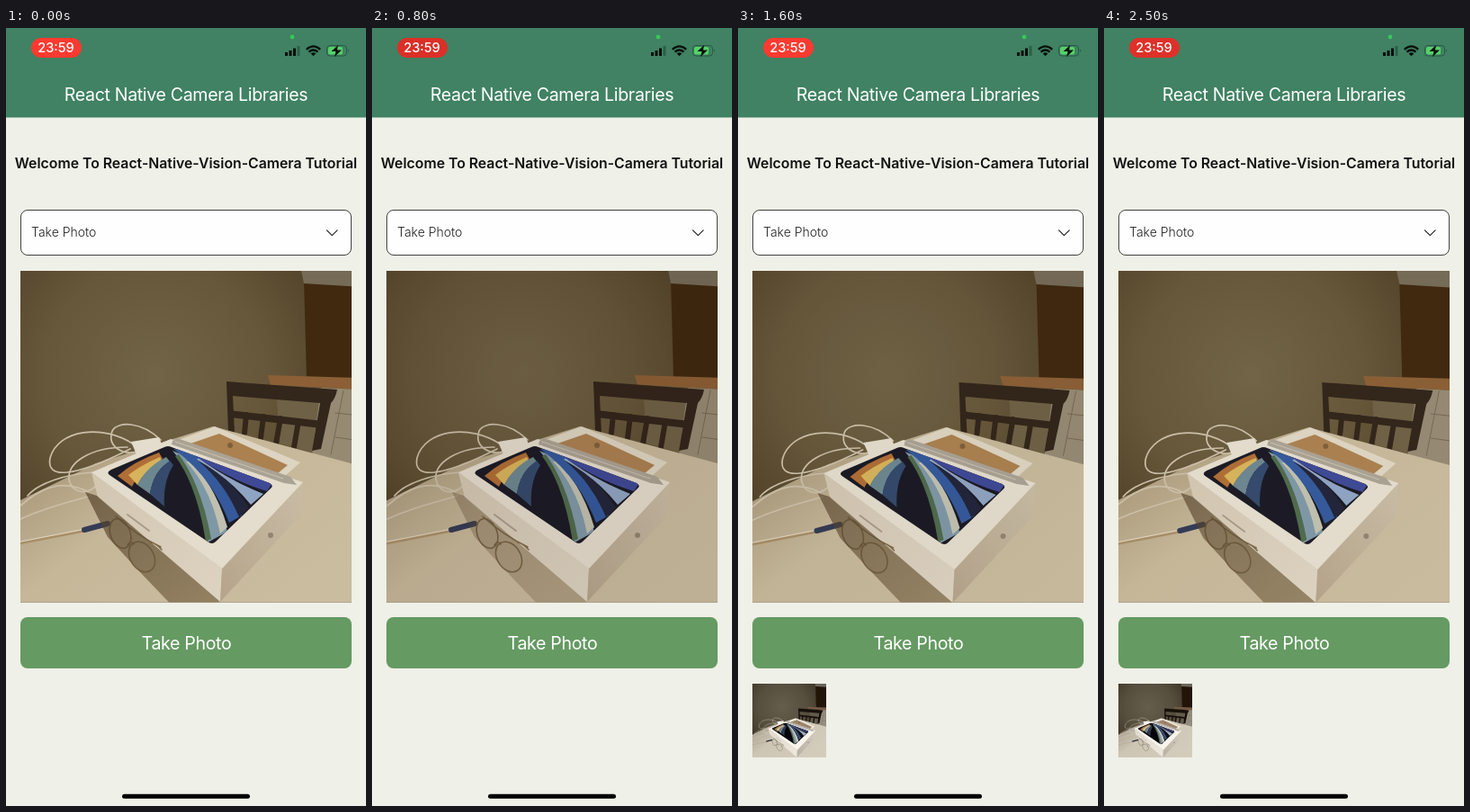
Write an HTML page that moves like this. It is 400 px wide and 865 px high and loops after 2.6 s.

```html
<!DOCTYPE html>
<html lang="en">
<head>
<meta charset="utf-8">
<title>Camera tutorial</title>
<style>
  html, body { margin: 0; width: 100%; height: 100%; overflow: hidden; background: #eff0e7; }
  svg { display: block; width: 100%; height: 100%; }
  text { font-family: Inter, Roboto, sans-serif; }
  .line { fill: none; stroke-linecap: round; stroke-linejoin: round; }
  .flashed { filter: saturate(.45) contrast(1.25); }
</style>
</head>
<body>
<svg viewBox="0 0 400 865">
  <defs>
    <clipPath id="frame"><path d="M16 270H384V638.500H16Z"/></clipPath>
    <clipPath id="display"><path d="M117 491L176 466Q180 464 184 466L293 506Q298 509 294 512L233 571Q229 575 224 571L115 497Q111 494 117 491Z"/></clipPath>
    <radialGradient id="wall" gradientUnits="userSpaceOnUse" cx="165" cy="385" r="250">
      <stop offset="0" stop-color="#726446"/>
      <stop offset=".5" stop-color="#66573a"/>
      <stop offset=".8" stop-color="#55462b"/>
      <stop offset="1" stop-color="#40301a"/>
    </radialGradient>
    <linearGradient id="table" x1="0" y1="0" x2="1" y2=".7">
      <stop offset="0" stop-color="#9c8b6c"/>
      <stop offset=".45" stop-color="#c6b799"/>
      <stop offset="1" stop-color="#cabc9f"/>
    </linearGradient>
    <linearGradient id="side" x1="0" y1="1" x2="1" y2="0">
      <stop offset="0" stop-color="#b5a48b"/>
      <stop offset="1" stop-color="#c9bca5"/>
    </linearGradient>
    <linearGradient id="front" x1="0" y1="0" x2="1" y2="1">
      <stop offset="0" stop-color="#d2c6b1"/>
      <stop offset="1" stop-color="#ddd3c1"/>
    </linearGradient>
    <linearGradient id="shade" x1="0" y1="0" x2="1" y2="1">
      <stop offset="0" stop-color="#4c3a22"/>
      <stop offset="1" stop-color="#7a6444"/>
    </linearGradient>

    <g id="scene">
      <path d="M6 260H394V650H6Z" fill="url(#wall)"/>
      <!-- kitchen -->
      <path d="M331 280H394V400L334 390Z" fill="#40290f"/>
      <path d="M326 260H394V288L331 284Z" fill="#756b57"/>
      <path d="M291 386L394 389V402L294 397Z" fill="#8c5f36"/>
      <path d="M300 397L350 400V475L304 462Z" fill="#6f6146"/>
      <path d="M350 400L394 402V492L340 475Z" fill="#968a73"/>
      <path d="M375 403L361 474M366 428L394 431M366 455L394 459" class="line" stroke="#75694f"/>
      <!-- chair -->
      <path d="M245 393L368 402Q366 412 361 417L350 468L340 470L349 417L252 409L254 450H247Z" fill="#33261b"/>
      <path d="M248 425L352 437L350 445L249 433Z" fill="#33261b"/>
      <path d="M267 430L265 450M286 432L283 456M305 434L300 462M325 437L320 466" class="line" stroke="#33261b" stroke-width="6"/>
      <!-- table -->
      <path d="M6 530L100 484L230 443L394 487V650H6Z" fill="url(#table)"/>
      <path d="M183 461L232 443L327 483L310 498Z" fill="#ddd4c1"/>
      <path d="M205 462L237 451L313 486L302 495Z" fill="#ab8150"/>
      <circle cx="249" cy="464" r="3" fill="#806039"/>
      <!-- cables -->
      <g class="line" stroke="#cbbfa8" stroke-width="1.700">
        <path d="M142 463C108 440 58 446 49 478C44 502 75 500 138 468"/>
        <path d="M172 458C150 437 124 437 118 448C112 466 130 475 146 471"/>
        <path d="M135 466C92 466 68 484 70 502C73 516 88 520 99 510"/>
        <path d="M98 494C66 496 36 506 24 520M90 515C60 501 38 512 16 531M94 520C60 530 40 535 16 546"/>
      </g>
      <path d="M139 460L170 455L175 468L145 474Z" fill="#e4dccd"/>
      <!-- box -->
      <path d="M95 494L240 601L238 638L102 522Z" fill="url(#front)"/>
      <path d="M240 601L330 505L328 541L238 638Z" fill="url(#side)"/>
      <path d="M95 494L183 457L330 505L240 601Z" fill="#e4dccc"/>
      <path d="M135 541L159 559" class="line" stroke="#a99b86" stroke-width="2"/>
      <circle cx="294" cy="564" r="3" fill="#938471"/>
      <g clip-path="url(#display)">
        <path d="M100 450H310V590H100Z" fill="#1c1b25"/>
        <path d="M124 498Q142 482 170 472L174 479Q150 488 140 510Z" fill="#b06e35"/>
        <path d="M136 497Q150 486 171 477L174 482Q155 490 146 508Z" fill="#d6b35c"/>
        <path d="M146 508Q156 488 178 477L182 482Q164 492 160 518Z" fill="#6d8790"/>
        <path d="M160 518Q163 494 182 481L186 486Q174 505 176 532Z" fill="#354a6c"/>
        <path d="M185 470Q214 502 224 572L246 560Q230 505 200 476Z" fill="#7f98a6"/>
        <path d="M188 476Q212 508 222 571L228 568Q217 508 192 474Z" fill="#4f6b4c"/>
        <path d="M200 482Q228 512 238 562L246 555Q232 508 205 482Z" fill="#c0c0b0"/>
        <path d="M186 468Q228 498 248 550L262 542Q240 500 212 470Z" fill="#35599b"/>
        <path d="M212 480Q243 505 259 544L270 533Q250 502 218 480Z" fill="#23253a"/>
        <path d="M212 480Q248 500 272 530L286 518Q246 502 214 478Z" fill="#8fa4c2"/>
        <path d="M200 465L300 500L290 515Q246 502 202 470Z" fill="#3f4a96"/>
      </g>
      <path d="M185 459L190 456L316 499L323 508L309 506L184 463Z" fill="#aaa293"/>
      <path d="M188 460L308 501" class="line" stroke="#c9c1b2"/>
      <!-- pen and glasses -->
      <path d="M6 575L88 559" class="line" stroke="#a88e68" stroke-width="2.500"/>
      <path d="M6 573L88 557" class="line" stroke="#e1d6c1"/>
      <path d="M87 558L113 551" class="line" stroke="#343c55" stroke-width="6"/>
      <g class="line" stroke="#806a49" stroke-width="1.600">
        <ellipse cx="127" cy="562" rx="11" ry="17" transform="rotate(-20 127 562)"/>
        <ellipse cx="151" cy="588" rx="13" ry="18" transform="rotate(-32 151 588)"/>
        <path d="M135 575Q139 569 142 574M122 543Q145 564 172 577M161 572Q167 573 173 580"/>
      </g>
    </g>
  </defs>

  <path d="M0 0H400V865H0Z" fill="#eff0e7"/>
  <path d="M0 0H400V99.500H0Z" fill="#408263"/>

  <!-- status bar -->
  <rect id="pill" x="28" y="11" width="56" height="22" rx="11"/>
  <text x="55.5" y="27.2" font-size="14.6" font-weight="500" fill="#fff" text-anchor="middle">23:59</text>
  <circle cx="318" cy="10" r="2.4" fill="#38c75a"/>
  <path d="M310 27h3v4h-3zM314.500 25h3v6h-3zM319 22.500h3v8.500h-3z" fill="#07100c"/>
  <path d="M323.500 20h3v11h-3z" fill="#2c6049"/>
  <path d="M333.800 23.800Q341.500 17 349.200 23.800M336.500 26.700Q341.500 22.400 346.500 26.700" fill="none" stroke="#07100c" stroke-width="2.300"/>
  <path d="M338.700 28.500Q341.500 26 344.300 28.500L341.500 31.300Z" fill="#07100c"/>
  <rect x="356.500" y="19.500" width="22" height="11.500" rx="3.500" fill="none" stroke="#275b44"/>
  <rect x="358" y="21" width="16" height="8.500" rx="2" fill="#55d168"/>
  <path d="M380 23.500q2 1.700 0 3.500z" fill="#275b44"/>
  <path d="M369 19L361.500 26H366.500L365 32L373 24.500H368Z" fill="#07100c"/>

  <text x="200" y="81" font-size="19.6" letter-spacing="-.35" fill="#fff" text-anchor="middle">React Native Camera Libraries</text>
  <text x="200" y="156" font-size="15.8" font-weight="600" fill="#111" text-anchor="middle">Welcome To React-Native-Vision-Camera Tutorial</text>

  <rect x="16.500" y="202.500" width="367" height="50" rx="7.500" fill="#fffeff" stroke="#222" stroke-width=".85"/>
  <text x="28" y="232.300" font-size="14" font-weight="300" fill="#222">Take Photo</text>
  <path d="M356.500 224.800L362.300 230.600L368.100 224.800" class="line" stroke="#222" stroke-width="1.200"/>

  <g clip-path="url(#frame)">
    <g id="camera">
      <use href="#scene"/>
      <path id="shadow" d="M88 516L101 520L238 638L192 650L148 604L113 566Z" fill="url(#shade)"/>
    </g>
    <path id="veil" d="M16 270H384V639H16Z"/>
  </g>

  <g id="button">
    <rect x="16" y="655" width="368" height="57" rx="8" fill="#659a62"/>
    <text x="200.500" y="691" font-size="19.6" letter-spacing="-.35" fill="#fff" text-anchor="middle">Take Photo</text>
  </g>

  <g id="thumb" transform="translate(16 729) scale(.2228) translate(-16 -270)" clip-path="url(#frame)">
    <use href="#scene" class="flashed"/>
  </g>

  <rect x="129" y="851.700" width="142" height="5" rx="2.500" fill="#000"/>
</svg>
<script>
const LOOP = 2600, STEP = 100;
const $ = id => document.getElementById(id);

// time, shift x, shift y, exposure, shadow
const keys = [
  [0, 0, 0, 0, .65],
  [250, 0, 0, 0, .6],
  [400, 0, 0, .16, .06],
  [600, 0, 0, -.13, .12],
  [1000, 2, 0, 0, .5],
  [1300, 2, 1, -.03, .6],
  [1900, -1, 1, -.02, .6],
  [2600, -3, 1, 0, .6]
];

function pose(t) {
  const i = keys.findIndex(k => k[0] > t);
  const a = keys[i - 1], b = keys[i];
  const p = (t - a[0]) / (b[0] - a[0]);
  return a.map((v, n) => v + (b[n] - v) * p);
}

// eased progress from 0 to 1
function ease(t, from, length) {
  const p = Math.min(1, Math.max(0, (t - from) / length));
  return p < .5 ? 2 * p * p : 1 - 2 * (1 - p) ** 2;
}

const mix = (from, to, p) =>
  `rgb(${from.map((v, i) => Math.round(v + (to[i] - v) * p))})`;

function draw(now) {
  const t = Math.floor(now % LOOP / STEP) * STEP;
  const [, x, y, light, shadow] = pose(t);
  $("camera").setAttribute("transform", `translate(${x} ${y})`);
  $("shadow").setAttribute("opacity", shadow);
  $("veil").setAttribute("fill", light > 0 ? "#fff3ea" : "#100c08");
  $("veil").setAttribute("opacity", Math.abs(light));
  // a tap fades the button, letting go restores it
  $("button").setAttribute("opacity", 1 - .8 * (ease(t, 20, 150) - ease(t, 220, 250)));
  const pulse = (1 + Math.cos((t + 150) / 1900 * 2 * Math.PI)) / 2;
  $("pill").setAttribute("fill", mix([218, 48, 40], [255, 59, 48], pulse));
  $("thumb").style.display = t >= 1100 ? "" : "none";
}

const start = performance.now();
function tick() {
  draw(performance.now() - start);
  requestAnimationFrame(tick);
}
tick();
</script>
</body>
</html>
```
